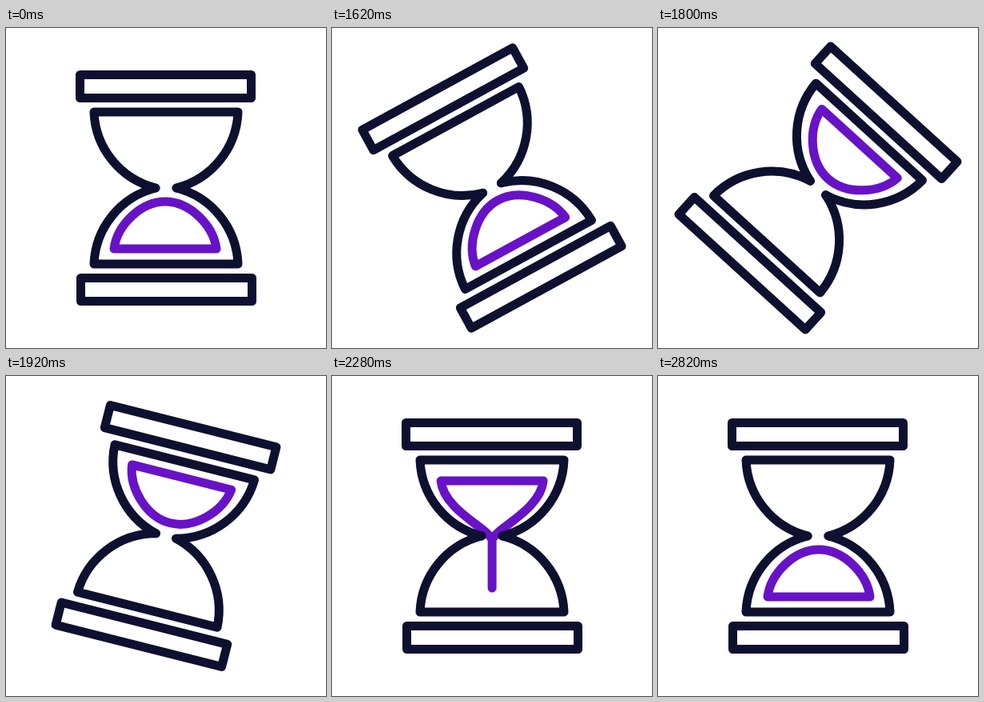
Recreate the animation shown at these times as an HTML page. Size 400 by 400 pixels, loop 2880 ms.

```html
<!DOCTYPE html>
<html lang="en">
<head>
<meta charset="utf-8">
<title>Hourglass</title>
<style>
  html, body { margin: 0; height: 100%; overflow: hidden; background: #fff; }
  svg { display: block; width: 100%; height: 100%; }
  g { fill: none; stroke: #0e1030; stroke-width: 11; stroke-linecap: round; stroke-linejoin: round; }
  #sand { stroke: #6812c8; }
</style>
</head>
<body>
<svg viewBox="0 0 400 400">
  <g id="hourglass">
    <path id="sand"/>
    <g id="half">
      <rect x="92.5" y="58.5" width="214" height="29"/>
      <path d="M187 200A102 102 0 0 1 110 105H290A102 102 0 0 1 213 200"/>
    </g>
    <use href="#half" transform="rotate(180 200 200)"/>
  </g>
</svg>
<script>
const LOOP = 2880, STEP = 30;
const TURN = [1500, 2145], POUR = [2130, 2300], SETTLE = [2300, 2820];
const HALF_WIDTH = 64;

const hourglass = document.getElementById('hourglass');
const sand = document.getElementById('sand');

const mix = (a, b, p) => a + (b - a) * p;
const progress = (t, [start, end]) => Math.min(1, Math.max(0, (t - start) / (end - start)));

// Cubic bezier easing (x1, 0, x2, 1), solved by bisection
function ease(x, x1, x2) {
  let lo = 0, hi = 1;
  for (let i = 0; i < 30; i++) {
    const s = (lo + hi) / 2, r = 1 - s;
    if (3 * x1 * s * r * r + 3 * x2 * s * s * r + s ** 3 < x) lo = s; else hi = s;
  }
  return lo * lo * (3 - 2 * lo);
}

// The upper bowl pinches into a stream (pour), then drains into a dome (settle)
function sandPath(pour, settle) {
  const cx = 201 - pour + settle;
  const topWidth = HALF_WIDTH * (1 - settle), bottomWidth = HALF_WIDTH * settle;
  const top = mix(124 + 8 * pour, 217, settle);
  const neck = 183 + 25 * pour + 9 * settle;
  const bottom = 183 + 93 * pour;
  const side = [
    [topWidth, top],
    [topWidth * 0.94, mix(top, neck, 0.5)],
    [topWidth * 0.48 * (1 - pour), mix(neck, top, 0.22 * pour)],
    [0, neck],
    [bottomWidth * 0.48, neck],
    [bottomWidth * 0.94, mix(neck, bottom, 0.5)],
    [bottomWidth, bottom]
  ];
  const left = side.map(([x, y]) => [cx - x, y]);
  const right = side.map(([x, y]) => [cx + x, y]).reverse();
  return `M${left[0]}C${left.slice(1).join(' ')}L${right[0]}C${right.slice(1).join(' ')}Z`;
}

function draw(time) {
  const t = Math.floor(time % LOOP / STEP) * STEP;
  const turn = ease(progress(t, TURN), 0.346, 0.165);
  hourglass.setAttribute('transform', `rotate(${180 * (1 - turn)} 200 200)`);
  sand.setAttribute('d', sandPath(progress(t, POUR), progress(t, SETTLE)));
}

const start = performance.now();
function tick() {
  draw(performance.now() - start);
  requestAnimationFrame(tick);
}
tick();
</script>
</body>
</html>
```
